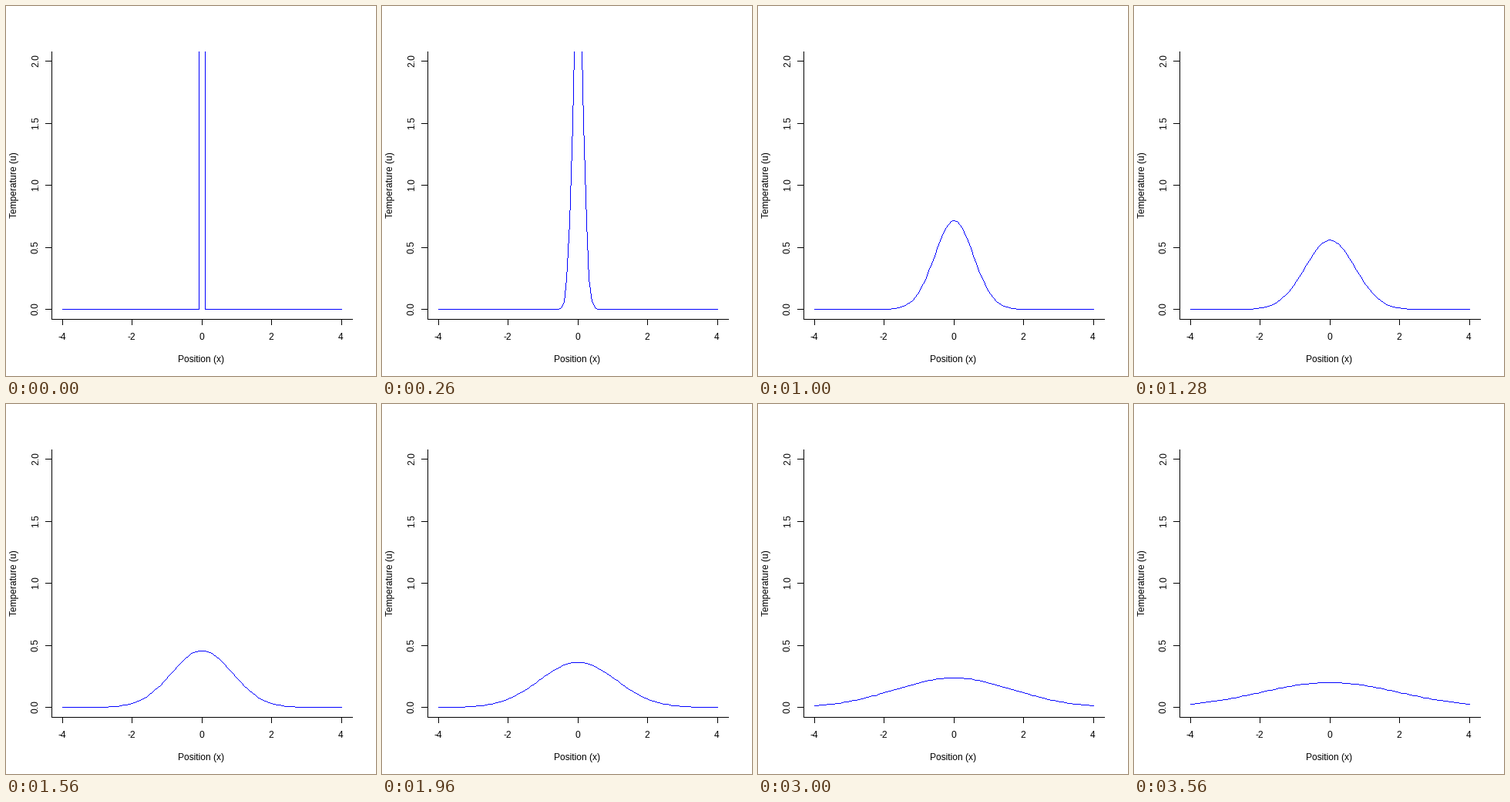
These frames come from a looping animation (480x480 px, 3580 ms). A matplotlib script:

```python
import numpy as np
import matplotlib.pyplot as plt
from matplotlib.animation import FuncAnimation
from matplotlib.collections import PolyCollection

SIZE = 480
LEFT, RIGHT, TOP, BOTTOM = 59, 449, 59, 406
X_MID, X_SCALE = 254.4, 45.22
Y_ZERO, Y_SCALE = 393.69, 160.89
FRAMES, INTERVAL = 179, 20

plt.rcParams["font.family"] = "Liberation Sans"
plt.rcParams["font.size"] = 12

fig = plt.figure(figsize=(SIZE / 72, SIZE / 72), dpi=72, facecolor="white")
ax = fig.add_axes([0, 0, 1, 1])
ax.set_xlim(0, SIZE)
ax.set_ylim(SIZE, 0)
ax.axis("off")


def col(x):
    return np.floor(X_MID + X_SCALE * x)


def row(u):
    return np.floor(Y_ZERO - Y_SCALE * u)


def bar(x, y, w, h):
    ax.add_patch(plt.Rectangle((x, y), w, h, facecolor="black",
                               linewidth=0, antialiased=False))


def label(x, y, text, rotation=0):
    ax.text(x, y, text, color="black", rotation=rotation, ha="center",
            va="baseline", rotation_mode="anchor")


def draw_axes():
    bar(LEFT, TOP, 1, BOTTOM - TOP + 1)
    bar(LEFT, BOTTOM, RIGHT - LEFT + 1, 1)
    for v in (-4, -2, 0, 2, 4):
        bar(col(v), BOTTOM, 1, 8)
        label(col(v) - 0.5, 433, str(v))
    for v in (0, 0.5, 1, 1.5, 2):
        bar(LEFT - 8, row(v), 8, 1)
        label(42, row(v), f"{v:.1f}", 90)
    label(253.3, 462, "Position (x)")
    label(14, 232.5, "Temperature (u)", 90)


def heat(x, root_t):
    """Heat kernel, with time given by its square root."""
    return np.exp(-(x / root_t) ** 2 / 4) / (np.sqrt(4 * np.pi) * root_t)


def steps(a, b, n):
    """Whole numbers from a to b; halves round towards b."""
    return a + np.sign(b - a) * np.floor(np.linspace(0, abs(b - a), n) + 0.5)


def trace(xs, ys):
    """Whole pixels along a polyline."""
    parts = []
    for x0, y0, x1, y1 in zip(xs, ys, xs[1:], ys[1:]):
        n = int(max(abs(x1 - x0), abs(y1 - y0))) + 1
        parts.append(np.column_stack([steps(x0, x1, n), steps(y0, y1, n)]))
    pixels = np.concatenate(parts)
    return np.unique(pixels[pixels[:, 1] >= TOP], axis=0)


grid = np.linspace(-4, 4, 101)
cell = np.array([[0, 0], [1, 0], [1, 1], [0, 1]])
curve = PolyCollection([], facecolors="blue", edgecolors="none",
                       linewidths=0, antialiaseds=False, zorder=3)
ax.add_collection(curve, autolim=False)
draw_axes()


def update(i):
    step = max(i, 1)  # the first state is held for two ticks
    pixels = trace(col(grid), row(heat(grid, 0.0079 * step)))
    curve.set_verts(pixels[:, None, :] + cell)
    return (curve,)


anim = FuncAnimation(fig, update, frames=FRAMES, interval=INTERVAL,
                     repeat=True, repeat_delay=0, blit=False)
plt.show()
```
